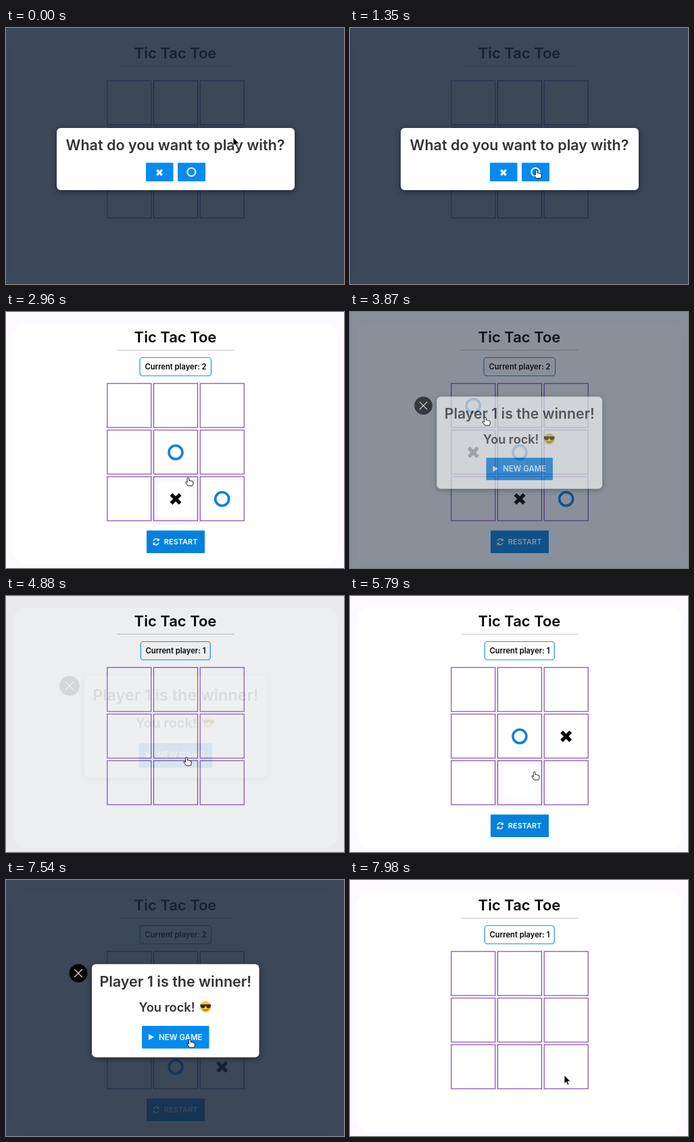
Animation, 500 px wide and 379 px high, one loop 8000 ms. Source, as an HTML page:

```html
<!DOCTYPE html>
<html lang="en">
<head>
<meta charset="utf-8">
<title>Tic Tac Toe</title>
<style>
html, body { margin: 0; width: 100%; height: 100%; overflow: hidden; background: #fcfafe; }
svg { display: block; width: 500px; height: 379px; }
text { font-family: Inter, "Open Sans", sans-serif; font-weight: 600; }
.mid { text-anchor: middle; }
.label { font-size: 11.2px; }
.head { font-size: 21.5px; fill: #333; }
.caps { font-size: 11px; fill: #fff; }
.cell { fill: none; stroke: #7639b0; stroke-width: 1.1; }
.hover { filter: drop-shadow(0 0 4px rgba(118, 57, 176, .55)); }
.box { fill: #fff; filter: drop-shadow(0 2px 5px rgba(0, 0, 0, .45)); }
.btn { fill: #058af0; }
</style>
</head>
<body>
<svg viewBox="0 0 500 379">
  <defs>
    <path id="x" d="M-6.6-6.6 6.6 6.6M6.6-6.6-6.6 6.6" fill="none" stroke-width="5.4"/>
    <circle id="o" r="10" fill="none" stroke-width="3.6"/>
  </defs>

  <rect width="500" height="379" fill="#fcfafe"/>
  <rect x="11" y="17" width="479" height="356" rx="18" fill="#fff"/>
  <text class="mid" x="250.5" y="45" font-size="22">Tic Tac Toe</text>
  <path d="M164 56.5H337.5" stroke="#c8c8cc"/>
  <g id="status">
    <rect id="frame" y="67.5" height="27" rx="4" fill="none" stroke="#2492e0" stroke-width="1.2"/>
    <text id="player" class="mid label" x="251" y="85"></text>
  </g>
  <g id="board"></g>
  <g id="restart">
    <rect x="208" y="323.5" width="86" height="33.5" rx="1" fill="#0381dd"/>
    <g fill="none" stroke="#fff" stroke-width="1.5">
      <path d="M218.3 339a4.1 4.1 0 0 1 7-2M225.9 341.4a4.1 4.1 0 0 1-7 2"/>
      <path d="M226.7 335v4h-4zM217.5 345.4v-4h4z" fill="#fff" stroke="none"/>
    </g>
    <text class="caps" x="233.8" y="344.2">RESTART</text>
  </g>

  <rect id="shade" width="500" height="379" fill="rgb(26,39,59)"/>

  <g id="ask">
    <rect class="box" x="75" y="148" width="352" height="92" rx="6"/>
    <text class="mid head" x="250.5" y="181">What do you want to play with?</text>
    <rect class="btn" x="207" y="199.5" width="40.5" height="27.5" rx="1"/>
    <rect class="btn" x="254" y="199.5" width="41" height="27.5" rx="1"/>
    <use href="#x" transform="translate(227 214) scale(.58)" stroke="#fff"/>
    <circle cx="274.3" cy="213.3" r="6" fill="none" stroke="#fff" stroke-width="2"/>
  </g>

  <g id="won">
    <circle cx="107" cy="138" r="13.5"/>
    <path d="M101.2 132.2l11.6 11.6M112.8 132.2l-11.6 11.6" stroke="#fff" stroke-width="1.2"/>
    <rect class="box" x="127" y="124.5" width="247.5" height="138" rx="6"/>
    <text class="mid head" x="250.8" y="158" font-size="21">Player 1 is the winner!</text>
    <text x="196.5" y="195" font-size="18.3" fill="#333">You rock!</text>
    <g transform="translate(295.3 187.8)">
      <circle r="8.2" fill="#fcc535"/>
      <path d="M-8-3.6H8L7.2.2Q6.4 2.2 3.8 2 1.4 1.8.7-1.4H-.7Q-1.4 1.8-3.8 2-6.4 2.2-7.2.2z" fill="#2d2926"/>
      <path d="M-3.6 4.2Q.6 6.4 4 3.4" fill="none" stroke="#70451a" stroke-width="1.1" stroke-linecap="round"/>
    </g>
    <rect class="btn" x="201" y="216" width="99.5" height="33.5" rx="1"/>
    <path d="M211 228v9l8-4.5z" fill="#fff"/>
    <text class="caps" x="226" y="236.6" style="font-size:11.5px">NEW GAME</text>
  </g>

  <g id="cursor">
    <path id="arrow" d="M0 0V12.6L2.9 9.9 5 14.6 7 13.7 5 9.2H9z" fill="#000" stroke="#fff" stroke-width=".8"/>
    <path id="hand" d="M-1.4 1.1Q-1.3 0 0 0T1.3 1.1V4.2Q2.8 3.5 3.5 4.7 5 4 5.6 5.3 7.3 4.8 7.3 6.5V8.6Q7.2 10.3 6.2 12H-.6Q-1.5 10-3.3 8-4.4 6.4-3.3 5.9-2.4 5.7-1.4 7.2z" fill="#fff" stroke="#111" stroke-width=".95" stroke-linejoin="round"/>
  </g>
</svg>
<script>
const LOOP = 8000, OPEN = 250, CLOSE = 170;
const $ = id => document.getElementById(id);
const show = (el, on) => el.setAttribute('visibility', on ? 'visible' : 'hidden');

// Each round: start time and its moves as [time, cell]; O goes first.
const rounds = [
  { start: 1687, moves: [[2120, 4], [2450, 7], [2780, 8], [3260, 3], [3660, 0]] },
  { start: 4727, moves: [[5270, 4], [5580, 5], [5900, 7], [6200, 8], [6620, 1]] },
  { start: 7800, moves: [] }
];
// Dialogs: [element, opens, closes]
const dialogs = [[$('ask'), -OPEN, 1687], [$('won'), 3720, 4727], [$('won'), 6675, 7800]];

// Pointer stops: [time, x, y, hand]
const stops = [
  [0, 336, 162, 0], [20, 336, 162, 0], [560, 288, 205, 1], [820, 277, 210, 1],
  [1280, 277, 210, 1], [1600, 268, 214, 1], [1840, 267.5, 214, 1], [2100, 262, 212, 1],
  [2420, 262, 272, 1], [2760, 318, 270, 1], [3240, 190, 205, 1], [3640, 199, 157, 1],
  [3870, 200, 156, 1], [3930, 202, 159, 0], [4380, 256, 219, 1], [4640, 269, 237, 1],
  [4880, 267, 239, 1], [5250, 260, 214, 1], [5560, 310, 210, 1], [5880, 264, 272, 1],
  [6180, 312, 274, 1], [6580, 276, 157, 1], [6700, 276, 155, 1], [6780, 275, 157, 0],
  [7220, 270, 219, 1], [7540, 272, 236, 1], [7800, 272, 236, 1], [7880, 290, 258, 0],
  [7980, 317, 289, 0], [8000, 317, 289, 0]
];

const svg = (tag, attrs, parent) => {
  const el = document.createElementNS('http://www.w3.org/2000/svg', tag);
  for (const k in attrs) el.setAttribute(k, attrs[k]);
  return parent.appendChild(el);
};

const cells = Array.from({ length: 9 }, (_, i) => {
  const x = 149.8 + i % 3 * 68.7, y = 105.8 + Math.floor(i / 3) * 69;
  const at = `translate(${x + 32.5} ${y + 33})`;
  return {
    x, y,
    box: svg('rect', { class: 'cell', x, y, width: 65, height: 65.2 }, $('board')),
    marks: [
      svg('use', { href: '#o', transform: at, stroke: '#0b80dc' }, $('board')),
      svg('use', { href: '#x', transform: at, stroke: '#000' }, $('board'))
    ]
  };
});

function pointer(t) {
  let i = 0;
  while (i < stops.length - 2 && stops[i + 1][0] <= t) i++;
  const [t0, x0, y0, hand] = stops[i], [t1, x1, y1] = stops[i + 1];
  const u = (t - t0) / (t1 - t0), e = u * u * (3 - 2 * u);
  return { x: x0 + (x1 - x0) * e, y: y0 + (y1 - y0) * e, hand };
}

function drawDialogs(t) {
  let alpha = 0, closing = false;
  show($('ask'), false);
  show($('won'), false);
  for (const [el, opens, closes] of dialogs) {
    if (t < opens || t >= closes + CLOSE) continue;
    closing = t >= closes;
    const p = Math.min(1, (t - opens) / OPEN), q = Math.max(0, (t - closes) / CLOSE);
    const scale = closing ? 1 + .1 * q : 1 - .173 * (1 - p) ** 3;
    alpha = closing ? 1 - q : p;
    show(el, true);
    el.setAttribute('opacity', alpha);
    el.setAttribute('transform', `translate(250.8 194) scale(${scale}) translate(-250.8 -194)`);
  }
  $('shade').setAttribute('opacity', .85 * alpha);
  return !closing && alpha < .5;
}

function draw(t) {
  const round = rounds.filter(r => t >= r.start).pop();
  const played = round ? round.moves.filter(m => t >= m[0]) : [];
  const next = played.length % 2 + 1, width = next === 1 ? 103 : 105.5;

  show($('status'), round);
  $('player').textContent = 'Current player: ' + next;
  $('frame').setAttribute('x', 250.8 - width / 2);
  $('frame').setAttribute('width', width);
  $('board').setAttribute('transform', `translate(0 ${round ? 0 : -27.7})`);
  show($('restart'), played.length);

  const active = drawDialogs(t), p = pointer(t);
  cells.forEach((c, i) => {
    const turn = played.findIndex(m => m[1] === i);
    c.marks.forEach((m, k) => show(m, turn >= 0 && turn % 2 === k));
    const over = p.x > c.x && p.x < c.x + 65 && p.y > c.y && p.y < c.y + 65;
    c.box.classList.toggle('hover', Boolean(active && p.hand && over));
  });

  $('cursor').setAttribute('transform', `translate(${p.x} ${p.y})`);
  show($('hand'), p.hand);
  show($('arrow'), !p.hand);
}

const began = performance.now();
function tick() {
  draw((performance.now() - began) % LOOP);
  requestAnimationFrame(tick);
}
tick();
</script>
</body>
</html>
```
